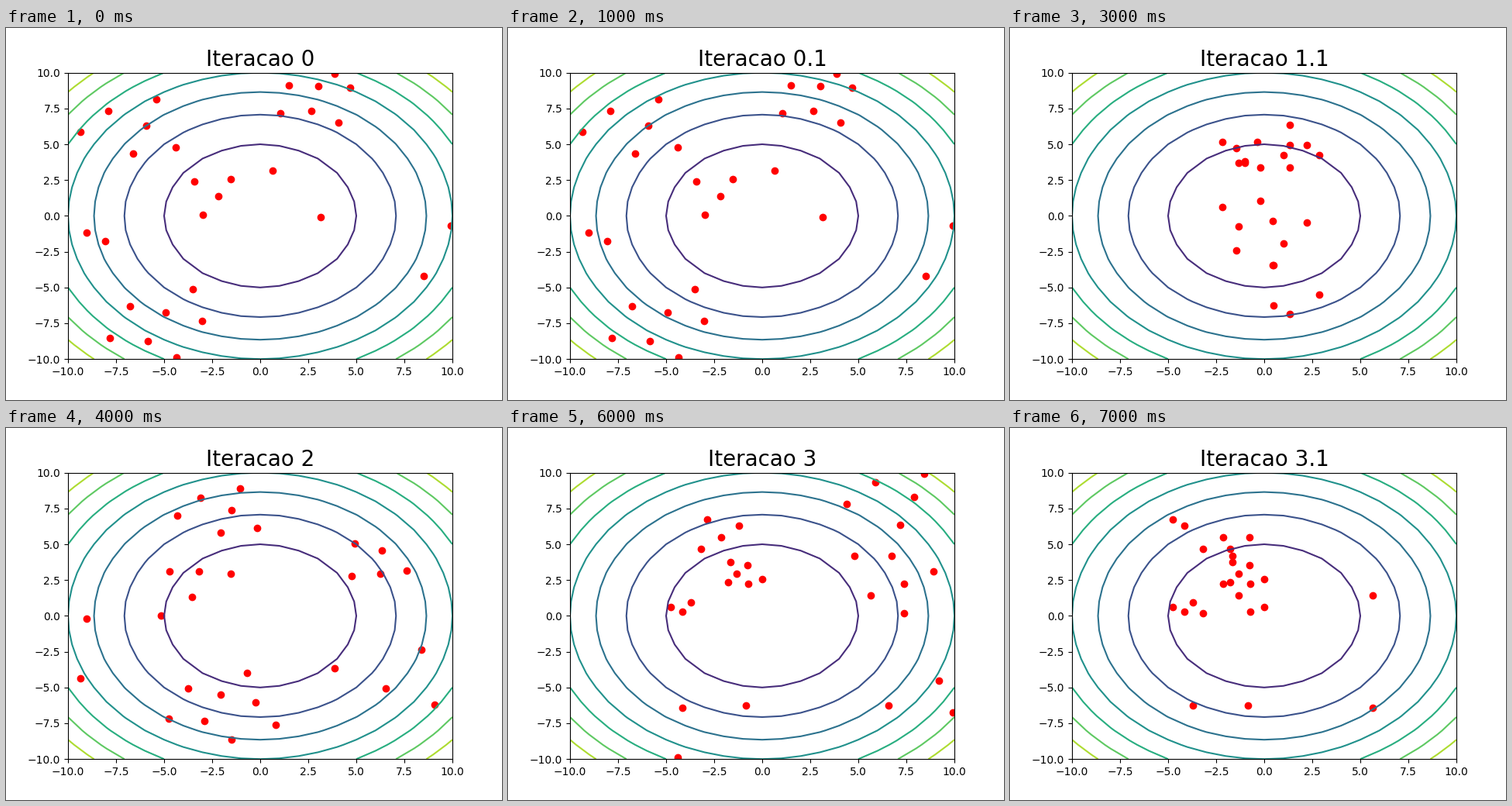
Animation, 640 px wide and 480 px high, one loop 8000 ms. Source, as a matplotlib script:

```python
import numpy as np
import matplotlib.pyplot as plt
from matplotlib.animation import FuncAnimation

LIMIT = 10
GOLDEN_ANGLE = np.pi * (3 - np.sqrt(5))
SURVIVORS, CHILDREN, MATE_GAP = 13, 12, 7

# Each generation gathers in a few groups: x, y, size, radius
generations = [
    [(-6.8, 6.3, 6, 3.0), (3.2, 8.4, 7, 2.6), (-2.8, 1.5, 4, 1.8),
     (-8.6, -1.2, 2, 0.9), (-4.9, -7.6, 7, 3.2), (1.7, 0.6, 2, 3.2),
     (9.2, -2.3, 2, 4.0)],
    [(5.0, 8.7, 4, 2.6), (-5.0, 5.3, 4, 1.8), (0.7, 4.7, 6, 2.3),
     (8.8, 3.7, 2, 1.0), (-0.1, -0.8, 8, 2.8), (-3.8, -7.6, 6, 3.0)],
    [(-2.2, 7.4, 6, 2.5), (-3.0, 2.4, 4, 2.0), (6.0, 3.5, 5, 2.0),
     (6.7, -3.8, 4, 3.6), (-2.0, -6.3, 8, 3.2), (-8.4, -1.7, 3, 4.0)],
    [(7.0, 8.3, 5, 2.8), (-2.6, 5.8, 4, 1.6), (-1.0, 2.8, 6, 1.2),
     (-4.1, 0.6, 3, 0.7), (6.8, 2.8, 6, 2.8), (8.6, -5.6, 3, 3.0),
     (-3.6, -7.7, 3, 3.4)],
]


def scatter_groups(groups):
    """Spread the members of each group along a golden-angle spiral."""
    points = []
    for x, y, size, radius in groups:
        for k in range(size):
            r = radius * np.sqrt((k + 0.5) / size)
            a = GOLDEN_ANGLE * len(points)
            points.append((x + r * np.cos(a), y + r * np.sin(a)))
    return np.clip(points, -LIMIT + 0.1, LIMIT - 0.1)


def select(pop):
    """Keep the fittest and add children mixing x and y of two parents."""
    ranked = pop[np.argsort((pop**2).sum(axis=1))]
    mates = ranked[MATE_GAP:MATE_GAP + CHILDREN]
    children = np.column_stack([ranked[:CHILDREN, 0], mates[:, 1]])
    return np.vstack([ranked[:SURVIVORS], children])


populations = [scatter_groups(g) for g in generations]

fig, ax = plt.subplots(figsize=(6.4, 4.8), dpi=100)
axis = np.arange(-LIMIT, LIMIT + 1)
X, Y = np.meshgrid(axis, axis)
ax.contour(X, Y, X**2 + Y**2, levels=range(25, 200, 25), vmin=0, vmax=200)
dots = ax.scatter([], [], c="red")
ax.set_xlim(-LIMIT, LIMIT)
ax.set_ylim(-LIMIT, LIMIT)
title = ax.set_title("", fontsize=20)


def update(n):
    gen, selecting = divmod(n, 2)
    pop = populations[gen]
    # The first population is shown unchanged in both of its steps
    dots.set_offsets(select(pop) if selecting and gen else pop)
    title.set_text(f"Iteracao {gen}" + (".1" if selecting else ""))
    return dots, title


anim = FuncAnimation(fig, update, frames=2 * len(populations), interval=1000,
                     init_func=lambda: update(0), repeat=True, repeat_delay=0)
plt.show()
```
